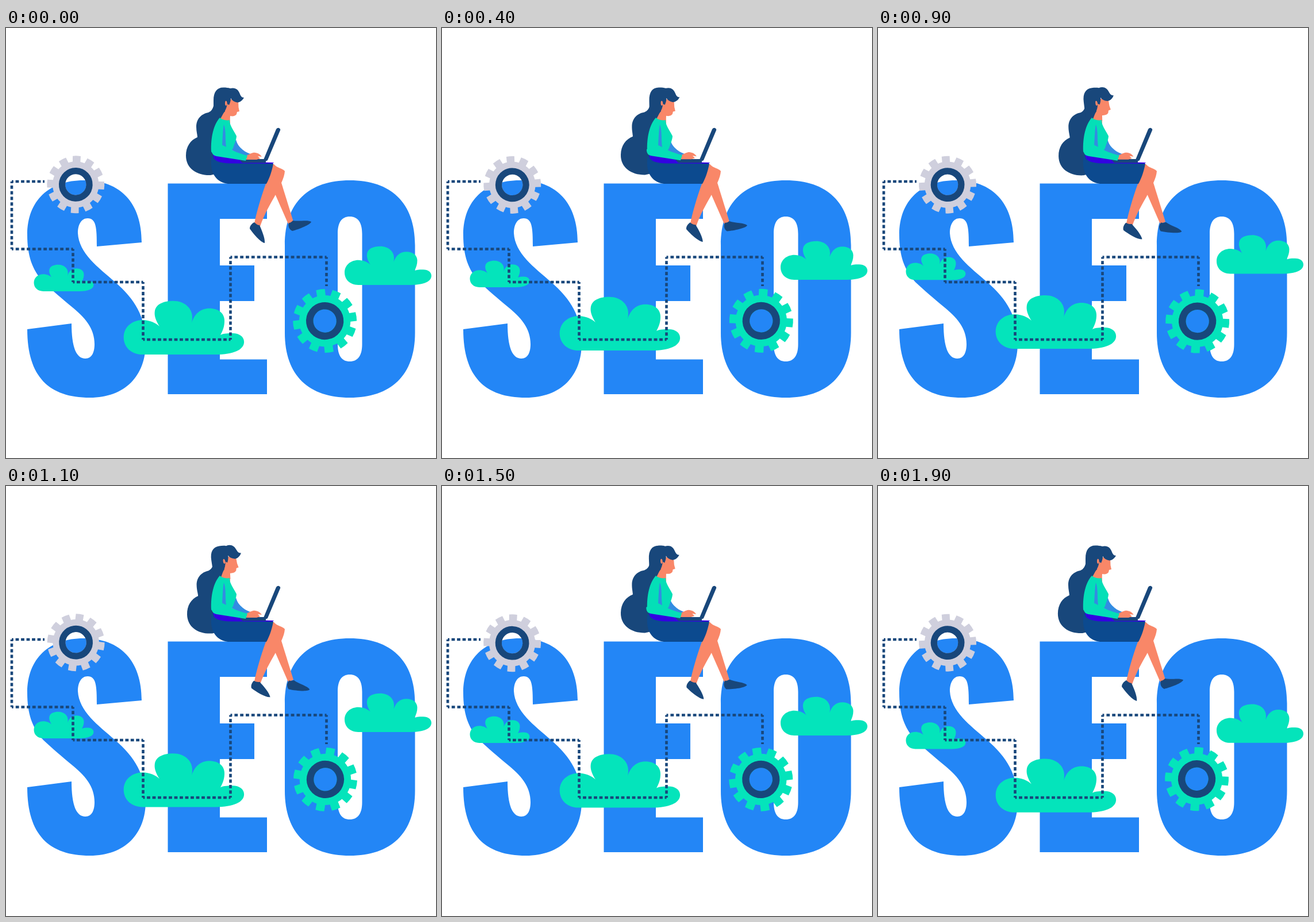
These frames come from a looping animation (748x748 px, 2 s). An HTML page with a canvas:

```html
<!DOCTYPE html>
<html lang="en">
<head>
<meta charset="utf-8">
<title>SEO</title>
<style>
html, body { margin: 0; width: 100%; height: 100%; overflow: hidden; background: #fff; }
canvas { display: block; width: 748px; height: 748px; }
</style>
</head>
<body>
<canvas id="stage" width="748" height="748"></canvas>
<script>
const ctx = document.getElementById('stage').getContext('2d');
const LOOP = 2000, STEP = 100;
const BLUE = '#2386f6', NAVY = '#18477b', MINT = '#04e4bb', SKIN = '#f98768';
const GREY = '#cfcfdd', TOP = '#04dfb7', SLEEVE = '#338ce2', SKIRT = '#0c4a8f', BELT = '#3302e2';
const p = d => new Path2D(d);

const letters = p(`M236,373 L158,380 C158,348 157,331 142,331 C131,331 125,342 125,357
  C127,392 160,416 190,442 C224,472 243,502 243,548 C243,605 207,643 146,643
  C75,643 37,607 37,524 L114,514 C114,555 122,575 138,575 C150,575 154,563 154,550
  C154,522 137,503 112,483 C98,471 81,457 65,442 C45,420 37,395 37,360
  C37,300 75,265 135,265 C200,265 236,305 236,373 Z
  M281.5,270.5 H454 V332 H372 V413 H432 V475 H372 V576.5 H454 V637 H281.5 Z`);
const letterO = p(`M485,378 C485,303 527,265 598,265 C669,265 711.5,303 711.5,378
  V530 C711.5,605 669,643 598,643 C527,643 485,605 485,530 Z
  M577,358 C577,338 584,328 598,328 C612,328 619.5,338 619.5,358
  V550 C619.5,570 612,580 598,580 C584,580 577,570 577,550 Z`);

// Cloud outline, with its bottom left corner at the origin
const cloud = p(`M33,0 C13,0 0,-13 0,-30 C0,-48 15,-60 33,-60 C45,-60 56,-55 62,-49
  C55,-60 53,-68 54,-75 C56,-88 70,-93 86,-93 C106,-93 119,-80 119,-65
  C119,-62 119,-59 118,-55 C123,-70 133,-80 149,-80 C165,-80 175,-71 175,-59
  C175,-50 173,-43 168,-34 C173,-37 183,-37 189,-37 C201,-37 209,-31 209,-22
  C209,-8 190,0 160,0 Z`);

const backHair = p(`M362,130 L384,140 L374,160 L372,252 L356,256 C333,257 313,245 313,222
  C313,206 321,195 333,190 C333,186 331,180 331,172 C331,157 341,149 352,147 C357,145 361,140 362,130 Z`);
const hair = p(`M361,126 C361,111 367,103.5 378,103.5 C383,103.5 387,104 390,105 C398,103 404,106 407,115
  C409,120 411,121 414,121 C411,127 406,129.5 402,129.5 C397,128.5 393,126 391,122
  C391,126 390,130 388,134 L385,132 C384,136 383,142 380,145 L373,158 L361,152 Z`);
const face = p(`M381,124 L404,124 L404.5,138 L406,145 L402,146 L401,150
  C399,153 395,154 390,153 L389,163 L374,162 L372,156 L381,145 Z`);
const neck = p('M380,146 L389,150 L390,166 H371 V157 Z');
const ear = p('M382,127 C384,126 385,130 384.5,133 C383.5,136 381.5,136 381,132 C381,129 381,128 382,127 Z');
const torso = p(`M372,156 C378,161 385,161 389,160 C389,170 395,176 401,188
  C401,194 397,202 395,209 L384,226 L362,222 L357,215 C356,190 361,168 372,156 Z`);
const seam = p('M379,168 C383,178 381,192 383,208 L376,205 C377,190 377,178 379,168 Z');
const farArm = p('M400,194 C402,202 406,207 412,212 C417,216 422,218 428,220 L416,225 L392,212 Z');
const nearArm = p('M358,212 C358,220 362,222 366,223 L417,231 L420,222 C408,219 392,213 383,207 L375,203 Z');
const hand = p(`M418,222 C425,219 429,216 434,217 C440,218 443,221 445,224
  L438,223 L442,227 L436,229 L417,229 Z`);
const belt = p('M360,220 L405,226 L412,233 L466,234 L458,241 L380,240 C366,236 361,230 360,220 Z');
const skirt = p(`M358,221 C362,232 372,235 390,235.5 L465,236 C462,252 457,264 453,271
  L386,271 C364,268 353,250 358,221 Z`);
const laptopBase = p('M405,228 H452 V234.5 H411 Z');
const screen = p('M448,229 L470,176 Q472,173 475,174 Q478,176 477,178 L455,230 Q452,233 448,229 Z');
const nearLeg = p(`M460,237 L466,237 C472,244 481,244 485,249 C484,262 477,273 470,288
  C460,306 450,322 442,345 L432,340 C436,320 443,296 452,271 Z`);
const farLeg = p('M478,266 L500,337 L491,341 L466,284 Z');
const leftShoe = p('M432,338 C435,341 438,343 441,343 C445,352 451,366 450,374 C443,373 430,358 424,349 C424,344 428,340 432,338 Z');
const rightShoe = p('M492,339 C495,339 497,337 499,335 C510,337 525,333 531,337 C530,342 510,350 498,353 C493,351 490,345 492,339 Z');

const TIMES = [0, 400, 700, 1100, 1500, 1700, 1900];
const RISE = {
  big: [0, 7, 9.7, 9.6, 8.5, 4, 0.3],
  right: [0, 9, 18, 19, 13, 4, 0.2],
  small: [0, 7, 17.7, 19, 11, 3.8, 0.5]
};
const HEAD = [0, 0.13, 0.5, 1, 0.28, 0.1, 0];
const SWAY = [0, 1.6, 0.4, -1.6, 1.6, 0.8, 0.1];
const REACH = [0, -3, -2, 0, -4, -2, -0.3];
const FOOT = [0, 0.36, 0.84, 1, 0.53, 0.21, 0.02];

// Smooth looping curve through the values at TIMES
function curve(values, t) {
  const n = TIMES.length;
  const at = i => TIMES[(i + n) % n] + Math.floor(i / n) * LOOP;
  const val = i => values[(i + n) % n];
  const slope = i => (val(i + 1) - val(i - 1)) / (at(i + 1) - at(i - 1));
  let i = n - 1;
  while (TIMES[i] > t) i--;
  const h = at(i + 1) - at(i), u = (t - at(i)) / h, v = 1 - u;
  return v * v * ((1 + 2 * u) * val(i) + u * h * slope(i)) +
         u * u * ((3 - 2 * u) * val(i + 1) - v * h * slope(i + 1));
}

function fill(path, color) {
  ctx.fillStyle = color;
  ctx.fill(path, 'evenodd');
}

function placed(draw, dx, dy, scale = 1) {
  ctx.save();
  ctx.translate(dx, dy);
  ctx.scale(scale, scale);
  draw();
  ctx.restore();
}

function turned(x, y, deg, draw) {
  ctx.save();
  ctx.translate(x, y);
  ctx.rotate(deg * Math.PI / 180);
  ctx.translate(-x, -y);
  draw();
  ctx.restore();
}

function drawCloud(x, y, scale) {
  placed(() => fill(cloud, MINT), x, y, scale);
}

const ROUTE = [[67, 267], [10, 267], [10, 384.5], [116.5, 384.5], [116.5, 442], [238.5, 442],
  [238.5, 542], [390.5, 542], [390.5, 398.5], [557.5, 398.5], [557.5, 449]];
const DASH = 5.8, PERIOD = 9.7;

// Dashes are fitted to each stretch so that every corner is covered
function drawRoute() {
  ctx.strokeStyle = NAVY;
  ctx.lineWidth = 4.6;
  for (let i = 1; i < ROUTE.length; i++) {
    const [x0, y0] = ROUTE[i - 1], [x1, y1] = ROUTE[i];
    const len = Math.hypot(x1 - x0, y1 - y0);
    ctx.setLineDash([DASH, len / Math.round(len / PERIOD) - DASH]);
    ctx.lineDashOffset = DASH / 2;
    ctx.beginPath();
    ctx.moveTo(x0, y0);
    ctx.lineTo(x1, y1);
    ctx.stroke();
  }
  ctx.setLineDash([]);
}

// Twelve-toothed wheel with an open centre; size is the tip radius
function drawGear(x, y, size, deg, color) {
  const rad = Math.PI / 180, root = size * 0.805, hole = size * 0.365;
  const wobble = (deg + 225) * rad;
  ctx.save();
  ctx.translate(x + 0.6 * Math.cos(wobble), y + 0.6 * Math.sin(wobble));
  ctx.rotate((deg - 90) * rad);
  ctx.beginPath();
  for (let i = 0; i < 12; i++) {
    const a = i * 30;
    ctx.arc(0, 0, root, (a - 20.4) * rad, (a - 9.6) * rad);
    ctx.arc(0, 0, size, (a - 8) * rad, (a + 8) * rad);
  }
  ctx.closePath();
  ctx.moveTo(hole, 0);
  ctx.arc(0, 0, hole, 0, 2 * Math.PI);
  ctx.fillStyle = color;
  ctx.fill('evenodd');
  ctx.beginPath();
  ctx.arc(0, 0, size * 0.475, 0, 2 * Math.PI);
  ctx.lineWidth = size * 0.225;
  ctx.strokeStyle = NAVY;
  ctx.stroke();
  ctx.restore();
}

function drawWoman(t) {
  const foot = curve(FOOT, t), reach = curve(REACH, t);

  turned(374, 150, curve(SWAY, t), () => fill(backHair, NAVY));
  fill(neck, SKIN);
  turned(381, 153, -8.5 * curve(HEAD, t), () => {
    fill(face, SKIN);
    fill(hair, NAVY);
    fill(ear, SKIN);
  });
  placed(() => fill(farArm, SLEEVE), reach, 0);
  fill(torso, TOP);
  fill(seam, SLEEVE);

  fill(farLeg, SKIN);
  fill(nearLeg, SKIN);
  turned(434, 341, -18.5 * foot, () => fill(leftShoe, NAVY));
  turned(494, 340, 27 * foot, () => fill(rightShoe, NAVY));

  fill(belt, BELT);
  fill(skirt, SKIRT);
  fill(laptopBase, NAVY);
  placed(() => {
    fill(hand, SKIN);
    fill(nearArm, TOP);
  }, reach * 0.7, reach * 0.25);
  fill(screen, NAVY);
}

function draw(t) {
  ctx.fillStyle = '#fff';
  ctx.fillRect(0, 0, 748, 748);
  fill(letters, BLUE);
  fill(letterO, BLUE);
  drawCloud(204.7, 568 - curve(RISE.big, t), 1.002);
  drawCloud(589, 447 - curve(RISE.right, t), 0.7225);
  drawCloud(48.5, 458 - curve(RISE.small, t), 0.497);
  drawRoute();
  drawGear(121.7, 272.8, 50, 2 + t * 0.36, GREY);
  drawGear(555.1, 509.9, 55.5, -8 + t * 0.18, MINT);
  drawWoman(t);
}

const start = performance.now();
function tick() {
  const t = (performance.now() - start) % LOOP;
  draw(Math.floor(t / STEP) * STEP);
  requestAnimationFrame(tick);
}
tick();
</script>
</body>
</html>
```
